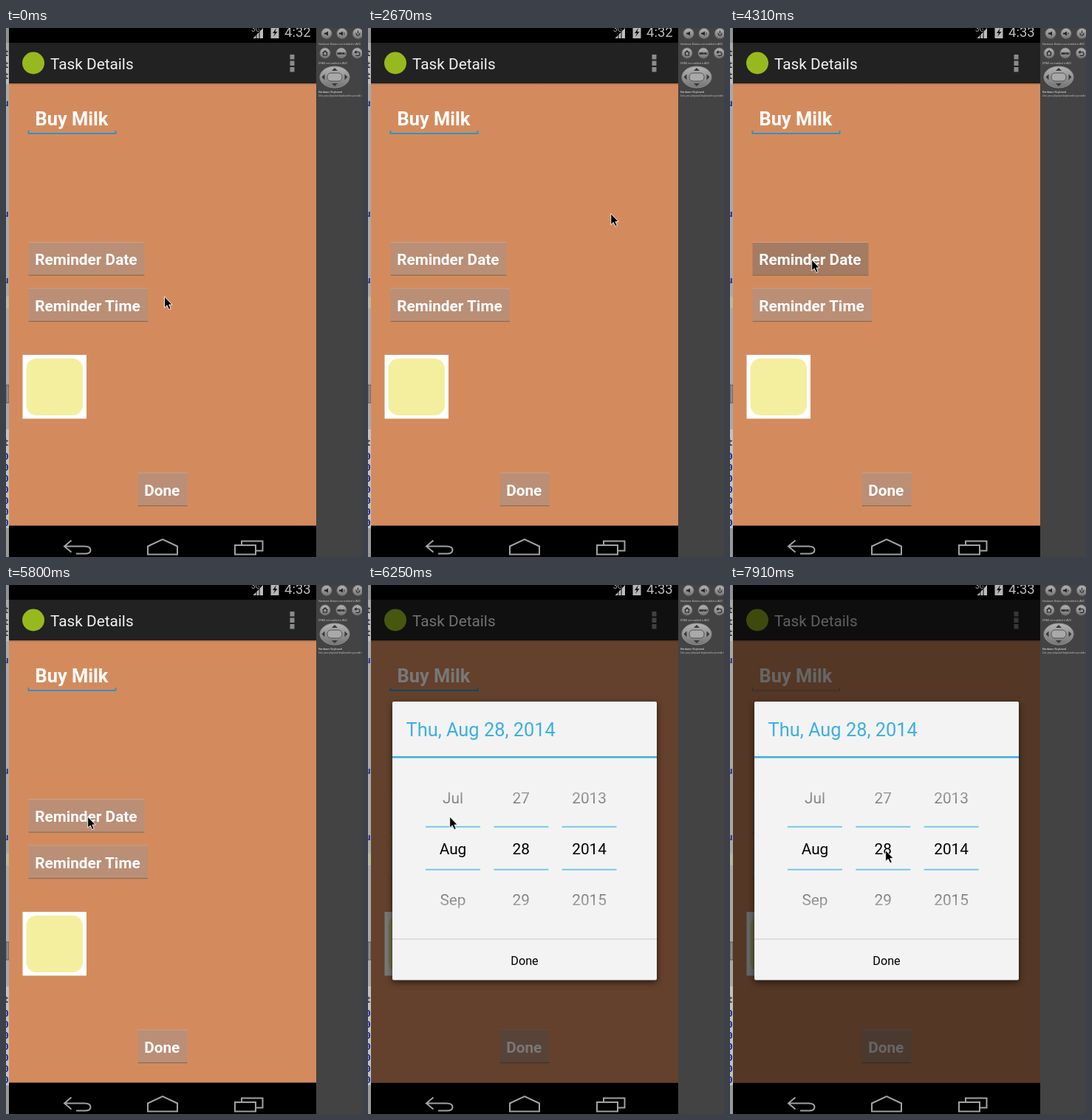
Animation of 482x717 px, one loop 8 s. Source, as an HTML page:

```html
<!DOCTYPE html>
<html lang="en">
<head>
<meta charset="utf-8">
<title>Task reminder</title>
<style>
  html, body { margin: 0; width: 100%; height: 100%; overflow: hidden; background: #000; }
  svg { display: block; width: 100vw; height: 100vh; font-family: Roboto, "Open Sans", sans-serif; }
  .label { fill: #fff; font-weight: 700; font-size: 20.8px; }
  .tiny { fill: #c4c4c4; font-size: 3.4px; font-family: "Liberation Sans", sans-serif; }
  .code { fill: #1c2f8c; font: 700 13px "DejaVu Sans Mono", monospace; }
  .nav { fill: none; stroke: #a2a2a2; stroke-width: 2; }
  .pick { font-size: 20.8px; text-anchor: middle; }
  #dialog { filter: drop-shadow(0 3px 4px rgba(0, 0, 0, .6)); transform-origin: 212px 347px; }
</style>
</head>
<body>
<svg viewBox="0 0 482 717">
  <defs>
    <linearGradient id="above" gradientUnits="userSpaceOnUse" x1="0" y1="278" x2="0" y2="300">
      <stop offset="0" stop-color="#a2a2a2"/><stop offset="1" stop-color="#787878"/>
    </linearGradient>
    <linearGradient id="below" gradientUnits="userSpaceOnUse" x1="0" y1="417" x2="0" y2="438">
      <stop offset="0" stop-color="#787878"/><stop offset="1" stop-color="#a8a8a8"/>
    </linearGradient>
    <linearGradient id="metal" x1="0" y1="0" x2="0" y2="1">
      <stop offset="0" stop-color="#b4b4b4"/><stop offset="1" stop-color="#747474"/>
    </linearGradient>
    <linearGradient id="barShade" x1="0" y1="0" x2="0" y2="1">
      <stop offset="0" stop-color="#000" stop-opacity=".3"/><stop offset="1" stop-color="#000" stop-opacity="0"/>
    </linearGradient>
    <clipPath id="edge"><rect width="4" height="717"/></clipPath>
  </defs>

  <!-- window edge on the left -->
  <g id="strip" clip-path="url(#edge)">
    <rect width="4" height="717" fill="#a9a9a9"/>
    <rect width="4" height="20" fill="#8f9290"/>
    <rect y="36" width="4" height="40" fill="#bcbcbc"/>
    <rect y="364" width="4" height="16" fill="#b3bba2"/>
    <rect y="484" width="4" height="24" fill="#8c8c8c" stroke="#555"/>
    <rect y="544" width="4" height="134" fill="#c2c2c2"/>
    <rect y="678" width="4" height="39" fill="#999"/>
  </g>

  <!-- emulator controls -->
  <rect x="420" width="62" height="717" fill="#434343"/>
  <g id="keys"></g>
  <text class="tiny" x="423" y="22.5">Hardware Buttons not enabled in AVD</text>
  <text class="tiny" x="423" y="49">DPAD not enabled in AVD</text>
  <text class="tiny" x="423" y="88" font-weight="700">Hardware Keyboard</text>
  <text class="tiny" x="423" y="92.5">Use your physical keyboard to provide input</text>
  <ellipse cx="445" cy="66.500" rx="20" ry="14.500" fill="url(#metal)" stroke="#8f8f8f"/>
  <rect x="435" y="61" width="20" height="11" rx="5" fill="#a9a9a9" stroke="#555"/>
  <path d="M445 54l4 4h-8zM445 79l4-4h-8zM427.500 66.500l4-4v8zM462.500 66.500l-4-4v8z" fill="#383838"/>

  <!-- phone screen -->
  <rect x="4" width="416" height="717" fill="#000"/>
  <text x="332" y="5" font-size="10" fill="#aaa">3G</text>
  <path d="M348 0V14H334.500Z" fill="#bdbdbd"/>
  <path d="M343 0V14M339 4V14" stroke="#000" stroke-width="1"/>
  <rect x="358.500" y="-3" width="11" height="17" fill="#b5b5b5"/>
  <path d="M366 0L361 7H364L362 12L367.500 5H364.500L366 0Z" fill="#111"/>
  <text id="clock" x="377" y="12.300" font-size="18.500" fill="#bdbdbd">4:32</text>

  <rect x="4" y="20" width="416" height="55" fill="#222"/>
  <rect x="4" y="75" width="416" height="599.500" fill="#d38b5e"/>
  <rect x="4" y="74.500" width="416" height="3" fill="url(#barShade)"/>
  <circle cx="37" cy="47.500" r="15" fill="#98b91e"/>
  <text x="60" y="55.700" font-size="20.800" fill="#f2f2f2">Task Details</text>
  <path d="M384.500 36h6v6.500h-6zM384.500 44.500h6v6.500h-6zM384.500 53h6v6.500h-6z" fill="#8b8b8b"/>

  <text class="label" x="39.500" y="132" style="font-size:25.400px">Buy Milk</text>
  <path id="field" d="M30.500 139V143H148.500V139" fill="none" stroke="#3194c4" stroke-width="2"/>
  <g id="buttons"></g>
  <rect x="22.500" y="443" width="86.500" height="86.500" fill="#fff"/>
  <rect x="27.500" y="448" width="76.500" height="77" rx="14" fill="#f3ef9f"/>

  <path class="nav" d="M88.500 694.500L79 702.500L88.500 710.500M79 702.500H106Q114.500 702.500 114.500 707.500Q114.500 712.500 107 712.500H95"/>
  <path class="nav" d="M192 713.500V702.500L212 693L232 702.500V713.500Z"/>
  <path class="nav" d="M310 701H338V713.500H310ZM319 701V695.500H347.500V708.500H338"/>

  <rect id="dim" x="4" y="20" width="416" height="654.500"/>

  <g id="dialog">
    <rect x="33" y="158" width="358" height="377.500" rx="2" fill="#f3f3f3"/>
    <text x="51.500" y="205.300" font-size="25.400" fill="#3cafe2">Thu, Aug 28, 2014</text>
    <rect x="33" y="232" width="358" height="2.600" fill="#3fb0e0"/>
    <g id="picker"></g>
    <rect x="33" y="479" width="358" height="1.800" fill="#dcdcdc"/>
    <text x="212" y="514.500" font-size="16.200" text-anchor="middle">Done</text>
  </g>

  <path id="mouse" d="M0 0V15L3.500 12L6 17.500L8.600 16.400L6.200 11H10.500Z" stroke="#fff" stroke-width=".9"/>
</svg>

<script>
const LOOP = 8000;
const $ = id => document.getElementById(id);

function add(parent, tag, attrs, text) {
  const el = document.createElementNS('http://www.w3.org/2000/svg', tag);
  for (const k in attrs) el.setAttribute(k, attrs[k]);
  if (text) el.textContent = text;
  $(parent).appendChild(el);
  return el;
}

// Code fragments on the window edge
for (const y of [106, 256, 346]) add('strip', 'text', { class: 'code', x: -4, y }, 'u');
for (let i = 0; i < 7; i++) add('strip', 'text', { class: 'code', x: -4, y: 585 + i * 15 }, '0');
for (const y of [38, 54, 69, 566]) add('strip', 'text', { class: 'code', x: -4, y, style: 'fill:#222' }, 't');

// Round emulator keys with simple glyphs
const GLYPHS = [
  [434, 7.5, 'M-3-1h2l3-2v6l-3-2h-2z'],
  [455, 7.5, 'M-4-1h2l3-2v6l-3-2h-2zM2.500-2q2 2 0 4z'],
  [476.5, 7.5, 'M-.5-4h1v4h-1zM-3-1q0 4 3 4t3-4l-1 0q0 3-2 3t-2-3z'],
  [432, 34, 'M-4 0L0-4L4 0H3V3.500H-3V0ZM-2 0V2.500H2V0L0-2Z'],
  [454, 34, ''],
  [475.500, 34, 'M-4-1l3-3v2h2q3 0 3 3t-3 3h-3v-1h3q2 0 2-2t-2-2h-2v2z']
];
for (const [x, y, d] of GLYPHS) {
  add('keys', 'circle', { cx: x, cy: y, r: 7.2, fill: 'url(#metal)', stroke: '#5c5c5c', 'stroke-width': .8 });
  add('keys', 'path', { d, transform: `translate(${x} ${y})`, fill: '#222' });
}
add('keys', 'text', { x: 454, y: 35.6, 'font-size': 4, 'font-weight': 700, 'text-anchor': 'middle' }, 'MENU');

function button(x, y, w, text) {
  const face = add('buttons', 'rect', { x, y, width: w, height: 45, rx: 1, fill: '#ba8f76' });
  add('buttons', 'rect', { x, y, width: w, height: 1, fill: '#c9a28a' });
  add('buttons', 'rect', { x, y: y + 44.5, width: w, height: 1.2, fill: '#8d6a55' });
  add('buttons', 'text', { class: 'label', x: x + 8.7, y: y + 31 }, text);
  return face;
}
const dateFace = button(30.5, 290, 157, 'Reminder Date');
button(30.5, 352.5, 161.5, 'Reminder Time');
button(178.5, 602.5, 67, 'Done');

// Date picker columns
[['Jul', 'Aug', 'Sep'], ['27', '28', '29'], ['2013', '2014', '2015']].forEach((col, i) => {
  const x = 115 + i * 92.3;
  col.forEach((text, row) => add('picker', 'text', {
    class: 'pick', x, y: 296 + row * 69.2, fill: ['url(#above)', '#000', 'url(#below)'][row]
  }, text));
  for (const y of [326.8, 384.8])
    add('picker', 'rect', { x: x - 37, y, width: 74, height: 1.8, fill: '#6cc3e8' });
});

// Pointer: [time, x, y], held until the next step; no place means hidden
const POINTER = [
  [0, 214.500, 364], [150, 172, 276], [300, 84, 160], [450, 45, 118],
  [590, 98, 226], [740, 146, 314], [1040, 145.500, 314.500],
  [1340, 300, 294], [1480, 446, 273.500], [1780],
  [2670, 328.800, 251.500], [2820, 308, 257], [2970, 272, 267], [3120, 228, 280],
  [3260, 184, 293], [3410, 146, 304], [3560, 121, 311], [3710, 110.700, 314],
  [7020, 146, 336], [7170, 168.500, 350.500],
  [7460, 178, 366], [7610, 192, 380], [7760, 205, 371], [7910, 210.700, 359.500]
];
// Dialog: [time, dim, opacity, scale]
const DIALOG = [[0, 0, 0, 1], [6100, .14, .94, .994], [6250, .53, 1, 1], [6420, .6, 1, 1]];

const at = (steps, t) => steps.findLast(s => s[0] <= t);

function draw(t) {
  const [, x, y] = at(POINTER, t);
  $('mouse').style.display = x === undefined ? 'none' : '';
  if (x !== undefined) $('mouse').setAttribute('transform', `translate(${x} ${y})`);

  const [, dim, alpha, scale] = at(DIALOG, t);
  $('dim').setAttribute('opacity', dim);
  $('dialog').style.display = alpha ? '' : 'none';
  $('dialog').style.opacity = alpha;
  $('dialog').style.transform = `scale(${scale})`;

  const focused = t < 6420;
  $('field').setAttribute('stroke', focused ? '#3194c4' : '#7d6a5e');
  $('field').setAttribute('stroke-width', focused ? 2 : 1);
  dateFace.setAttribute('fill', t >= 4310 && t < 5800 ? '#a57b62' : '#ba8f76');
  $('clock').textContent = t < 4310 ? '4:32' : '4:33';
}

const start = performance.now();
function tick() {
  draw((performance.now() - start) % LOOP);
  requestAnimationFrame(tick);
}
tick();
</script>
</body>
</html>
```
